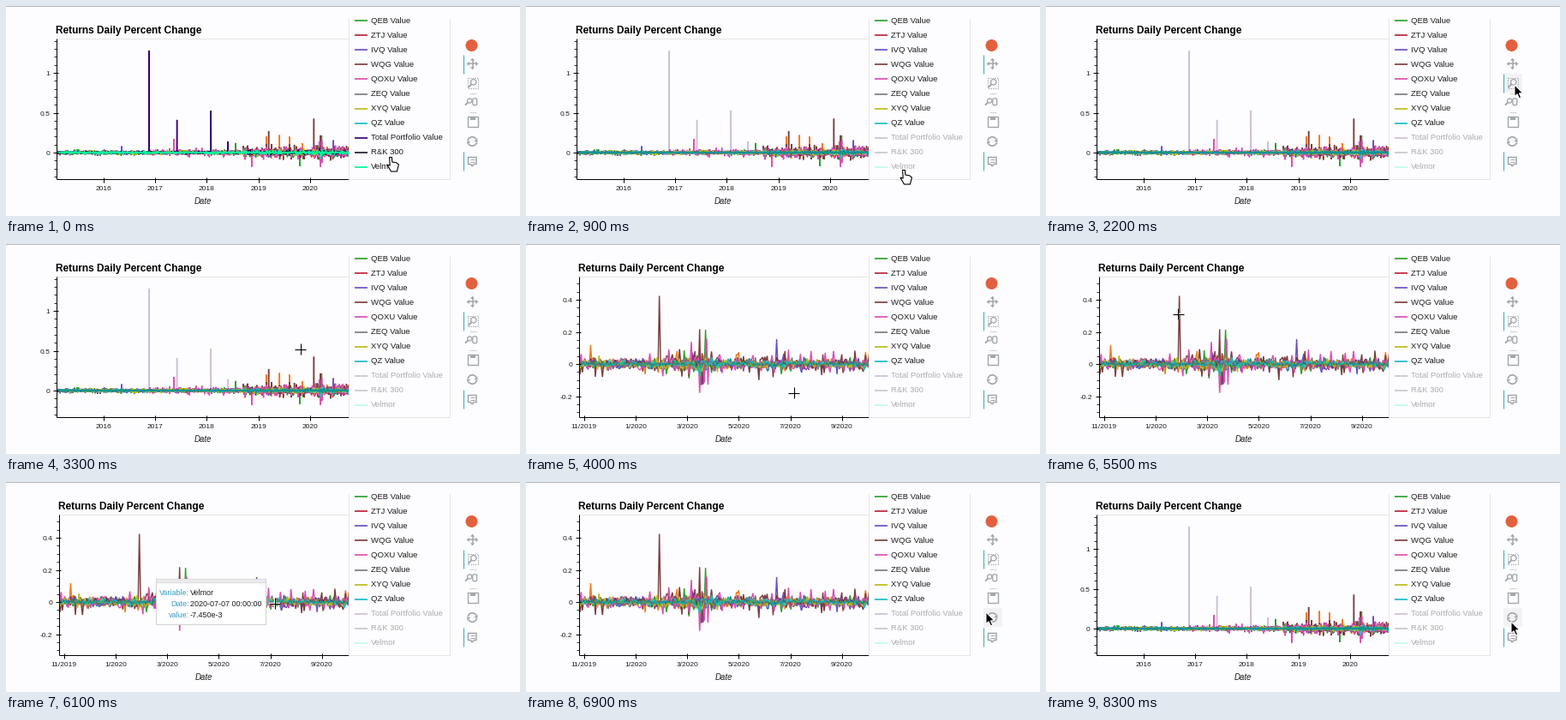
These frames come from a looping animation (600 px wide and 245 px high, 8400 ms). A matplotlib script:

```python
import numpy as np
import matplotlib.pyplot as plt
from matplotlib.animation import FuncAnimation
from matplotlib.patches import Arc, Circle, FancyBboxPatch, Polygon, Rectangle

W, H, DPI = 600, 245, 100
FRAMES, STEP = 84, 100
PT = 72 / DPI
BG, EDGE, ICON, ACTIVE, INK = "#fdfcfe", "#e5e5e5", "#a1a6a9", "#4fb3bf", "#1c1c1c"
TOP, BOTTOM, RIGHT = 38.5, 201.5, 400
TOOL_AT, DRAG_AT, ZOOM_AT, RESET_AT = 22, 34, 38, 74

plt.rcParams["font.family"] = "Liberation Sans"
fig = plt.figure(figsize=(W / DPI, H / DPI), dpi=DPI, facecolor=BG)
ax = fig.add_axes([0, 0, 1, 1])
ax.set_xlim(0, W)
ax.set_ylim(H, 0)
ax.axis("off")


def line(xs, ys, color="black", width=1.0, z=3, **kw):
    return ax.plot(xs, ys, color=color, lw=width * PT, zorder=z,
                   solid_capstyle="butt", **kw)[0]


def text(x, y, s, px, color=INK, z=5, **kw):
    return ax.text(x, y, s, fontsize=px * PT, color=color, zorder=z, **kw)


def rect(x0, y0, x1, y1, face, edge="none", z=4, width=1.0, **kw):
    return ax.add_patch(Rectangle((x0, y0), x1 - x0, y1 - y0, facecolor=face,
                                  edgecolor=edge, lw=width * PT, zorder=z, **kw))


def poly(points, face, edge="none", width=1.0, z=6):
    return ax.add_patch(Polygon(points, closed=True, facecolor=face,
                                edgecolor=edge, lw=width * PT, zorder=z))


def ring(x, y, r, face="none", width=1.3):
    ax.add_patch(Circle((x, y), r, facecolor=face, edgecolor=ICON,
                        lw=width * PT, zorder=6))


# --- daily returns: name, colour, first year, spread, landmark days ---
SERIES = [
    ("", "#1f77b3", 2015, .008, {}),
    ("", "#ee7a1c", 2018.75, .014, {2019.155: .2, 2019.41: .22, 2019.6: .2, 2019.856: .117}),
    ("QEB Value", "#2ba02b", 2015, .012, {2018.56: .12, 2019.8: -.17, 2020.227: .213}),
    ("ZTJ Value", "#b8243a", 2015, .007, {}),
    ("IVQ Value", "#6a4fc4", 2015, .012, {2016.35: .08, 2020.457: .155}),
    ("WQG Value", "#7a3f3f", 2018.7, .020, {2019.2: .27, 2020.078: .424}),
    ("QOXU Value", "#d94fb4", 2016.88, .017, {2017.36: .17, 2018.87: -.18, 2020.205: -.18}),
    ("ZEQ Value", "#7c7c7c", 2015, .008, {}),
    ("XYQ Value", "#bcbd16", 2015, .010, {}),
    ("QZ Value", "#16bcc4", 2015, .007, {2020.2465: .045}),
    ("Total Portfolio Value", "#330072", 2015, .007,
     {2016.88: 1.28, 2017.42: .41, 2018.08: .525, 2018.41: .14}),
    ("R&K 300", "#1c1c28", 2015, .006, {2020.2465: -.016}),
    ("Velmor", "#00f59b", 2015, .007, {2020.2465: -.009525}),
]
MUTE_AT = {"Total Portfolio Value": 3, "R&K 300": 6, "Velmor": 9}

days = np.arange(2015.0, 2020.85, 1 / 261)
crash = 1.6 * np.exp(-((days - 2020.21) / .05) ** 2)
unrest = np.where(days > 2018.7, 1.5, 1) + crash
rng = np.random.default_rng(7)


def returns(start, spread, landmarks):
    vals = np.clip(rng.standard_t(6, days.size) * .8, -3.5, 3.5) * spread * unrest
    for when, value in landmarks.items():
        vals[np.argmin(abs(days - when))] = value
    vals[days < start] = np.nan
    return vals


DATA = [(name, color, returns(*rest)) for name, color, *rest in SERIES]


class View:
    """One axis range with its ticks, title and curves."""

    def __init__(self, left, year0, x0, per_year, y0, per_unit, x_ticks, y_ticks, minor):
        self.x_of = lambda t: x0 + (t - year0) * per_year
        self.y_of = lambda v: y0 - per_unit * v
        self.parts, self.curves = [], {}
        add = self.parts.append
        clip = Rectangle((left, TOP), RIGHT - left, BOTTOM - TOP, transform=ax.transData)
        for name, color, vals in DATA:
            curve = line(self.x_of(days), self.y_of(vals), color, 1.45, 2,
                         solid_joinstyle="bevel")
            curve.set_clip_path(clip)
            add(curve)
            self.curves[name] = curve
        add(line([left, RIGHT], [TOP, TOP], EDGE))
        add(line([left, left], [TOP, BOTTOM]))
        add(line([left, RIGHT], [BOTTOM, BOTTOM]))
        for when, label in x_ticks:
            x = self.x_of(when)
            add(line([x, x], [BOTTOM - 2, BOTTOM + 4]))
            add(text(x, 215, label, 8.4, ha="center"))
        for value in y_ticks:
            y = self.y_of(value)
            add(line([left - 4, left + 2], [y, y]))
            add(text(left - 7, y + 3, f"{value:g}", 8.4, ha="right"))
        for k in range(-20, 40):
            y = self.y_of(k * minor)
            if TOP < y < BOTTOM:
                add(line([left - 2.5, left], [y, y], width=.8))
        add(text(left - .5, 32, "Returns Daily Percent Change", 11.85, "black", weight="bold"))
        add(text((left + RIGHT) / 2 + .5, 231, "Date", 9.7, style="italic", ha="center"))

    def show(self, on):
        for part in self.parts:
            part.set_visible(on)

    def hits(self, x, y):
        """Named series with a point close to the pointer."""
        day = np.argmin(abs(self.x_of(days) - x))
        return [(name, days[day], vals[day]) for name, _, vals in DATA
                if name and abs(self.y_of(vals[day]) - y) < 10]


YEARS = [(y, str(y)) for y in range(2016, 2021)]
MONTHS = [(2019 + (m - 1) / 12, f"{(m - 1) % 12 + 1}/{2019 + (m - 1) // 12}")
          for m in range(11, 23, 2)]
full = View(58.5, 2016, 114, 60.2, 171, 93, YEARS, [0, .5, 1], .1)
zoom = View(61.5, 2020, 128, 361, 140, 187.5, MONTHS, [-.2, 0, .2, .4], .05)

# --- page edge and legend ---
rect(0, 0, W, 1.2, "#b9b7bb")
rect(RIGHT, 14, 517.5, BOTTOM, BG)
for x in (RIGHT, 517.5):
    line([x, x], [14, BOTTOM], EDGE, z=5)
line([RIGHT, 517.5], [BOTTOM, BOTTOM], EDGE, z=5)
legend = {}
for row, (name, color, _) in enumerate(d for d in DATA if d[0]):
    y = 17 + 17 * row
    legend[name] = (line([407, 422], [y + .5, y + .5], color, 1.7, 5),
                    text(426, y + 3.4, name, 9.45))


# --- toolbar ---
def draw_pan(cx, cy):
    for dx, dy in ((1, 0), (-1, 0), (0, 1), (0, -1)):
        out, side = np.array([dx, dy]), np.array([dy, dx])
        tip = np.array([cx, cy]) + 6.8 * out
        line([cx, cx + 5 * dx], [cy, cy + 5 * dy], ICON, 1.5, 6)
        poly([tip, tip - 3 * out + 2.6 * side, tip - 3 * out - 2.6 * side], ICON)


def draw_magnifier(x, y, r):
    ring(x, y, r, BG)
    line([x - .7 * r, x - 2 * r], [y + .7 * r, y + 2 * r], ICON, 1.9, 6)


def draw_reset(cx, cy, r):
    for turn, s in ((190, 1), (10, -1)):
        ax.add_patch(Arc((cx, cy), 2 * r, 2 * r, theta1=turn, theta2=turn + 140,
                         edgecolor=ICON, lw=1.4 * PT * 1.2, zorder=6))
        x, y = cx + s * (r + 1), cy + .6 * s
        poly([(x, y), (x - 4.2 * s, y - .6 * s), (x - .2 * s, y - 4.2 * s)], ICON)


def draw_bubble(x0, y0, x1, y1):
    mid = (x0 + x1) / 2
    poly([(x0, y0), (x1, y0), (x1, y1), (mid + 2, y1), (mid, y1 + 2.5),
          (mid - 2, y1), (x0, y1)], "none", ICON, 1.5)
    for y in (y0 + 2.6, y0 + 5):
        line([x0 + 2, x1 - 2], [y, y], ICON, 1, 6)


ax.add_patch(Circle((543.5, 46), 7, facecolor="#e2603f", zorder=6))
draw_pan(544.5, 67.5)
rect(538.5, 84, 550.5, 95.5, "none", ICON, 6, 1.1, linestyle=(0, (1.2, 1.2)))
draw_magnifier(545.8, 88.8, 3.2)
draw_magnifier(541.2, 110.5, 2.6)
ax.add_patch(FancyBboxPatch((546.5, 109.5), 1.5, 4.5, boxstyle="round,pad=1.7",
                            facecolor="none", edgecolor=ICON, lw=1.3 * PT, zorder=6))
rect(538.5, 128.5, 550.5, 140.5, "none", ICON, 6, 1.4)
rect(541.5, 128.5, 548, 132.5, ICON, z=6)
draw_reset(544.3, 158, 5.2)
draw_bubble(539.5, 176.5, 549, 184.5)
for y in (102, 123.5):
    line([540.5, 548.5], [y, y], "#cfd1d3", 1, 6)
line([533.5, 533.5], [170, 192], ACTIVE, 1.2, 6)
tool_mark = line([533.5, 533.5], [57, 79], ACTIVE, 1.2, 6)
hover_box = rect(534, 0, 556, 22, "#f3f1f3")
band = rect(0, 0, 1, 1, (.83, .83, .83, .5), "#444444", 6, 1.2, linestyle=(0, (3, 3)))

# --- pointer shapes, relative to the hot spot ---
ARROW = np.array([(0, 0), (0, 13.5), (3.1, 10.7), (5.4, 15.8), (7.6, 14.8),
                  (5.4, 9.9), (9.6, 9.7)])
HAND = np.array([(-1.4, .5), (1.4, .5), (1.8, 6), (6.6, 6.8), (9.4, 9), (7.4, 17),
                 (.5, 17), (-4, 9.2), (-.8, 10)])
arrow = poly(ARROW, "black", "white", 1, 12)
hand = poly(HAND, "white", "black", 1.1, 12)
hand.set_joinstyle("round")
cross = [line([], [], "white", 2.4, 12), line([], [], "black", 1.1, 12)]

# frame, x, y of each rest or turn of the pointer
STOPS = np.array([
    (0, 449, 176), (2, 455, 155), (9, 441, 191), (18, 560, 104), (22, 547, 92),
    (29, 349, 167), (33, 343.5, 122.5), (37, 399, 201), (43, 226, 146), (45, 226, 146),
    (47, 217, 141), (55, 154, 82), (58, 156.2, 62), (63, 399, 185), (69, 537, 152),
    (83, 543, 163)])


def pointer_at(i):
    """Ease from stop to stop."""
    k = min(np.searchsorted(STOPS[:, 0], i, side="right") - 1, len(STOPS) - 2)
    (f0, *a), (f1, *b) = STOPS[k], STOPS[k + 1]
    u = (i - f0) / (f1 - f0)
    return np.array(a) + (np.array(b) - a) * u * u * (3 - 2 * u)


def move_pointer(x, y, over_plot):
    over_legend = RIGHT <= x < 517 and y < BOTTOM
    for part in cross:
        part.set_data([x - 6.5, x + 6.5, np.nan, x, x], [y, y, np.nan, y - 6.5, y + 6.5])
        part.set_visible(over_plot)
    hand.set_xy(HAND + (x, y))
    hand.set_visible(over_legend)
    arrow.set_xy(ARROW + (x, y))
    arrow.set_visible(not (over_plot or over_legend))


tips = []


def draw_tip(x, y, z, name, when, value):
    side = 1 if x < 230 else -1
    left = x + 10.5 if side > 0 else x - 138.5
    year = int(when)
    date = np.datetime64(f"{year}-01-01") + int(round((when - year) * 365.5))
    number = f"{value:.3f}" if abs(value) >= .1 else f"{value:.3e}".replace("e-0", "e-")
    tips.append(poly([(x + 5 * side, y), (x + 11 * side, y - 6), (x + 11 * side, y + 6)],
                     "#909599", z=z))
    tips.append(rect(left, y - 24.5, left + 128, y + 25, "white", "#d2d2d2", z))
    rows = (("Variable:", name), ("Date:", f"{date} 00:00:00"), ("value:", number))
    for r, (label, content) in enumerate(rows):
        base = y - 9.3 + 13 * r
        tips.append(text(left + 39, base, label, 9, "#3a9dbd", z + .1, ha="right"))
        tips.append(text(left + 40, base, content, 9, INK, z + .1))


def update(i):
    while tips:
        tips.pop().remove()
    zoomed = ZOOM_AT <= i < RESET_AT
    full.show(not zoomed)
    zoom.show(zoomed)
    view = zoom if zoomed else full
    for name, start in MUTE_AT.items():
        muted = i >= start
        sample, label = legend[name]
        for part in (full.curves[name], zoom.curves[name], sample):
            part.set_alpha(.24 if muted else 1)
        label.set_alpha(.35 if muted else 1)

    x, y = pointer_at(i)
    over_plot = 59 < x < RIGHT and TOP < y < BOTTOM
    move_pointer(x, y, over_plot)
    tool_mark.set_ydata([57, 79] if i < TOOL_AT else [79, 101])
    hover_box.set_visible(False)
    for top in (79, 147):
        if 533 < x < 556 and top <= y < top + 22:
            hover_box.set_y(top)
            hover_box.set_visible(True)

    band.set_visible(DRAG_AT <= i < ZOOM_AT)
    band.set_bounds(343.5, 122, x - 343.5, y - 122)
    if over_plot:
        for k, (name, when, value) in enumerate(view.hits(x, y)[-4:]):
            draw_tip(view.x_of(when), view.y_of(value), 9 + k * .2, name, when, value)
    return []


anim = FuncAnimation(fig, update, frames=FRAMES, interval=STEP, init_func=lambda: [],
                     repeat=True, repeat_delay=0, blit=False)
plt.show()
```
